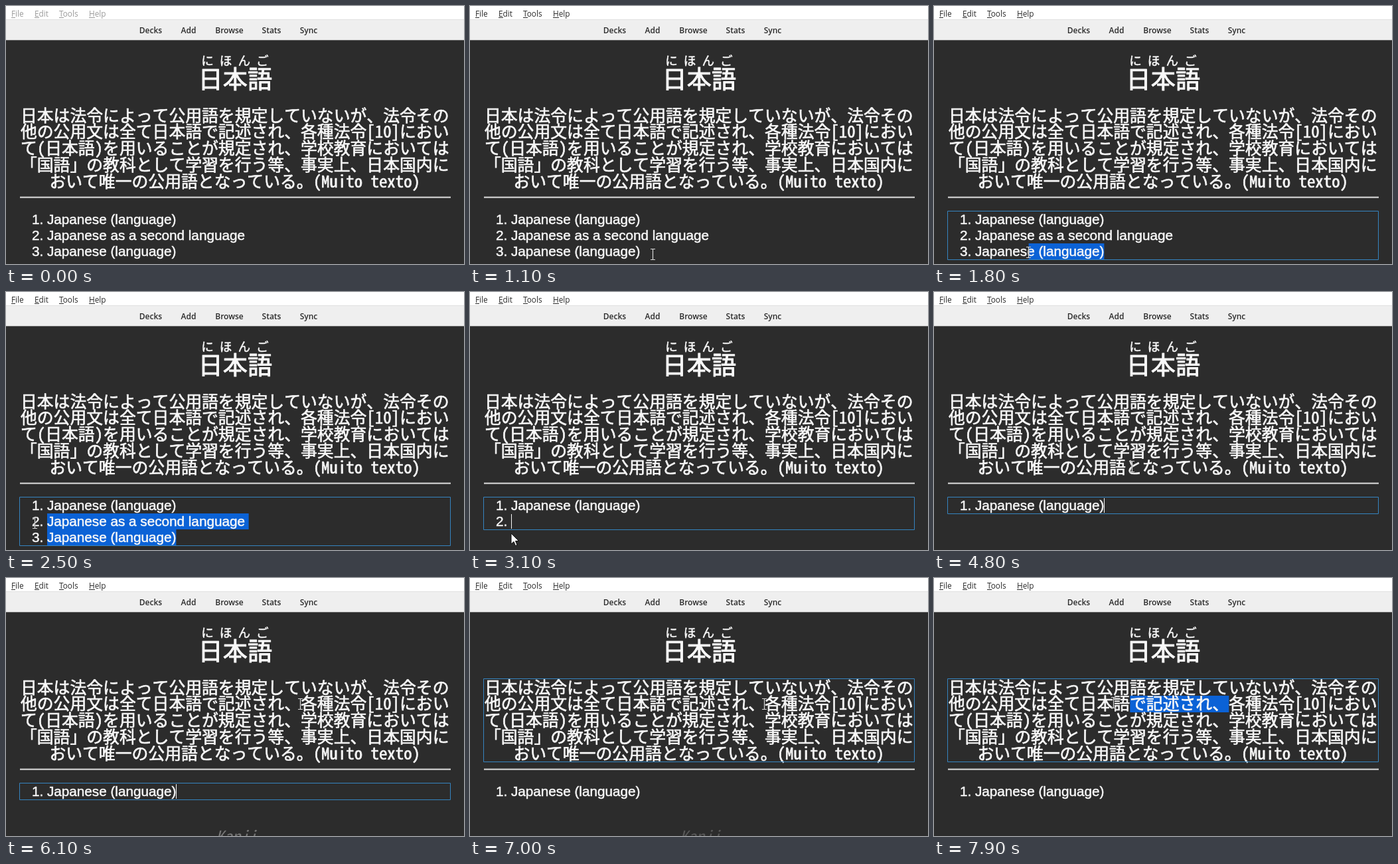
Write an HTML page with a canvas that moves like this. It is 690 px wide and 388 px high and loops after 8 s.

```html
<!DOCTYPE html>
<html lang="ja">
<head>
<meta charset="utf-8">
<title>Card editor</title>
<style>
html, body { margin: 0; width: 100%; height: 100%; overflow: hidden; background: #2c2c2c; }
canvas { display: block; width: 690px; height: 388px; }
</style>
</head>
<body>
<canvas id="stage" width="690" height="388"></canvas>
<script>
const ctx = document.getElementById('stage').getContext('2d');
const LOOP = 8000, STEP = 100;
const CJK = '"Noto Sans Mono CJK JP", "Noto Sans CJK JP", "Noto Sans CJK", "Noto Sans Mono", monospace';
const UI = '"Open Sans", "Noto Sans", sans-serif';
const LIST = '"Liberation Sans", Arial, sans-serif';
const EM = 24.83, LEFT = 345 - 13 * EM;
const BLUE = '#0b62d6', FOCUS = '#3584c0', WHITE = '#f8f8f8';

const menu = [['File', 8], ['Edit', 43], ['Tools', 80], ['Help', 125]];
const tools = [['Decks', 218], ['Add', 275], ['Browse', 336.5], ['Stats', 400], ['Sync', 456]];
const body = [
  '日本は法令によって公用語を規定していないが、法令その',
  '他の公用文は全て日本語で記述され、各種法令[10]におい',
  'て(日本語)を用いることが規定され、学校教育においては',
  '「国語」の教科として学習を行う等、事実上、日本国内に',
  'おいて唯一の公用語となっている。(Muito texto)'
];
const items = ['Japanese (language)', 'Japanese as a second language', 'Japanese (language)'];

// pointer path: time, x, y
const path = [
  [300, 400, 400], [1000, 276, 373], [1200, 276, 373], [1500, 258, 371],
  [2000, 80, 369], [2400, 44, 347], [2800, 44, 347], [3200, 65, 367],
  [4200, 65, 367], [4800, 299, 262], [5000, 300, 240], [5200, 304, 236],
  [5900, 444, 189], [7600, 444, 189], [7900, 271, 187]
];

const ease = u => u * u * (3 - 2 * u);

function pointerAt(t) {
  const i = path.findIndex(p => p[0] > t);
  if (i === 0) return null;
  if (i < 0) { const [, x, y] = path[path.length - 1]; return { x, y }; }
  const [t0, x0, y0] = path[i - 1], [t1, x1, y1] = path[i];
  const u = ease((t - t0) / (t1 - t0));
  return { x: x0 + (x1 - x0) * u, y: y0 + (y1 - y0) * u };
}

function rect(x, y, w, h, color) {
  ctx.fillStyle = color;
  ctx.fillRect(x, y, w, h);
}

// heavy: width of an outline in the text colour that thickens the strokes
function text(str, x, y, font, { color = WHITE, align = 'left', heavy = 0 } = {}) {
  ctx.font = font;
  ctx.fillStyle = ctx.strokeStyle = color;
  ctx.textAlign = align;
  ctx.fillText(str, x, y);
  if (heavy) {
    ctx.lineWidth = heavy;
    ctx.lineJoin = 'round';
    ctx.strokeText(str, x, y);
  }
}

function frame(top, bottom) {
  ctx.strokeStyle = FOCUS;
  ctx.lineWidth = 1;
  ctx.strokeRect(20.5, top + 0.5, 649, bottom - top);
}

function drawBars(active) {
  rect(0, 0, 690, 21, '#ffffff');
  rect(0, 21, 690, 30, '#efefef');
  rect(0, 20, 690, 1, '#e0e0e0');
  rect(0, 51, 690, 1, '#6e6e6e');
  const color = active ? '#2a2a2a' : '#9a9a9a';
  for (const [label, x] of menu) {
    text(label, x, 15.5, '11.8px ' + UI, { color });
    rect(x, 17, Math.round(ctx.measureText(label[0]).width), 1, color);
  }
  for (const [label, x] of tools) {
    text(label, x, 41, '600 12px ' + UI, { color: '#2a2a2a', align: 'center' });
  }
}

function drawWord() {
  [...'にほんご'].forEach((c, i) =>
    text(c, 303.5 + i * 27.6, 88.7, '18.6px ' + CJK, { align: 'center', heavy: 0.5 }));
  text('日本語', 345.3, 124, '37.2px ' + CJK, { align: 'center', heavy: 1 });
}

function drawBody(t, p) {
  if (t >= 7600) {
    const from = LEFT + Math.ceil((p.x - LEFT) / EM) * EM, to = LEFT + 17 * EM;
    rect(from, 177, to - from, 25, BLUE);
  }
  body.forEach((line, i) =>
    text(line, 344.7, 173.6 + i * 24.75, EM + 'px ' + CJK, { align: 'center', heavy: 0.7 }));
  if (t >= 6900) frame(151, 276);
  rect(21, 286.6, 649, 2.2, '#d0d0d0');
}

function drawList(t, p, count) {
  const font = '20.7px ' + LIST, x0 = 62, style = { heavy: 0.5 };
  const width = str => { ctx.font = font; return ctx.measureText(str).width; };
  if (t >= 1500 && t < 3100) {
    const end = x0 + width(items[2]), upper = p.y < 357;
    const from = upper ? x0 : Math.min(end, Math.max(x0, p.x));
    rect(from, 357, end - from, 24, BLUE);
    if (upper) {
      const x = Math.max(x0, p.x);
      rect(x, 333, x0 + width(items[1] + ' ') - x, 24, BLUE);
    }
  }
  for (let i = 0; i < count; i++) {
    const y = 328 + i * 24;
    text(i + 1 + '.', 39, y, font, style);
    if (i === 0 || count === 3) text(items[i], x0, y, font, style);
  }
  if (t >= 1400 && t < 6300) frame(308, 309 + count * 24);
  if (t >= 3100 && t < 6300) {
    if (count === 2) rect(62, 334, 1, 22, WHITE);
    else rect(Math.round(x0 + width(items[0])), 310, 1, 22, WHITE);
  }
}

function drawHint(t) {
  if (t < 5400 || t >= 7400) return;
  ctx.globalAlpha = Math.min(1, (t - 5300) / 400) * (t < 6700 ? 1 : 0.6);
  text('Kanji', 347, 398, 'italic ' + EM + 'px ' + CJK, { color: '#777777', align: 'center' });
  ctx.globalAlpha = 1;
}

function drawPointer({ x, y }, listBottom) {
  const inField = (y > 151 && y < 277) || (y > 308 && y < listBottom);
  ctx.save();
  ctx.translate(Math.round(x), Math.round(y));
  ctx.lineJoin = 'miter';
  ctx.beginPath();
  if (inField) {
    ctx.moveTo(-4, -7.5); ctx.lineTo(3, -7.5);
    ctx.moveTo(-0.5, -7); ctx.lineTo(-0.5, 8);
    ctx.moveTo(-4, 8.5); ctx.lineTo(3, 8.5);
    ctx.lineWidth = 2;
    ctx.strokeStyle = 'rgba(44, 44, 44, 0.6)';
    ctx.stroke();
    ctx.lineWidth = 1.2;
    ctx.strokeStyle = '#d8d8d8';
    ctx.stroke();
  } else {
    const tip = [0, -1, 0, 15, 4, 11.5, 6.5, 17.5, 9, 16.5, 6.5, 10.5, 11.5, 10.5];
    for (let i = 0; i < tip.length; i += 2) ctx.lineTo(tip[i], tip[i + 1]);
    ctx.closePath();
    ctx.fillStyle = '#ffffff';
    ctx.fill();
    ctx.lineWidth = 1;
    ctx.strokeStyle = '#111111';
    ctx.stroke();
  }
  ctx.restore();
}

function draw(t) {
  const p = pointerAt(t);
  const count = t < 3100 ? 3 : t < 3900 ? 2 : 1;
  rect(0, 0, 690, 388, '#2c2c2c');
  drawBars(t >= 500);
  drawWord();
  drawBody(t, p);
  drawList(t, p, count);
  drawHint(t);
  if (p) drawPointer(p, 309 + count * 24);
}

const start = performance.now();
function tick() {
  const t = Math.max(0, performance.now() - start) % LOOP;
  draw(Math.floor(t / STEP) * STEP);
  requestAnimationFrame(tick);
}
tick();
</script>
</body>
</html>
```
